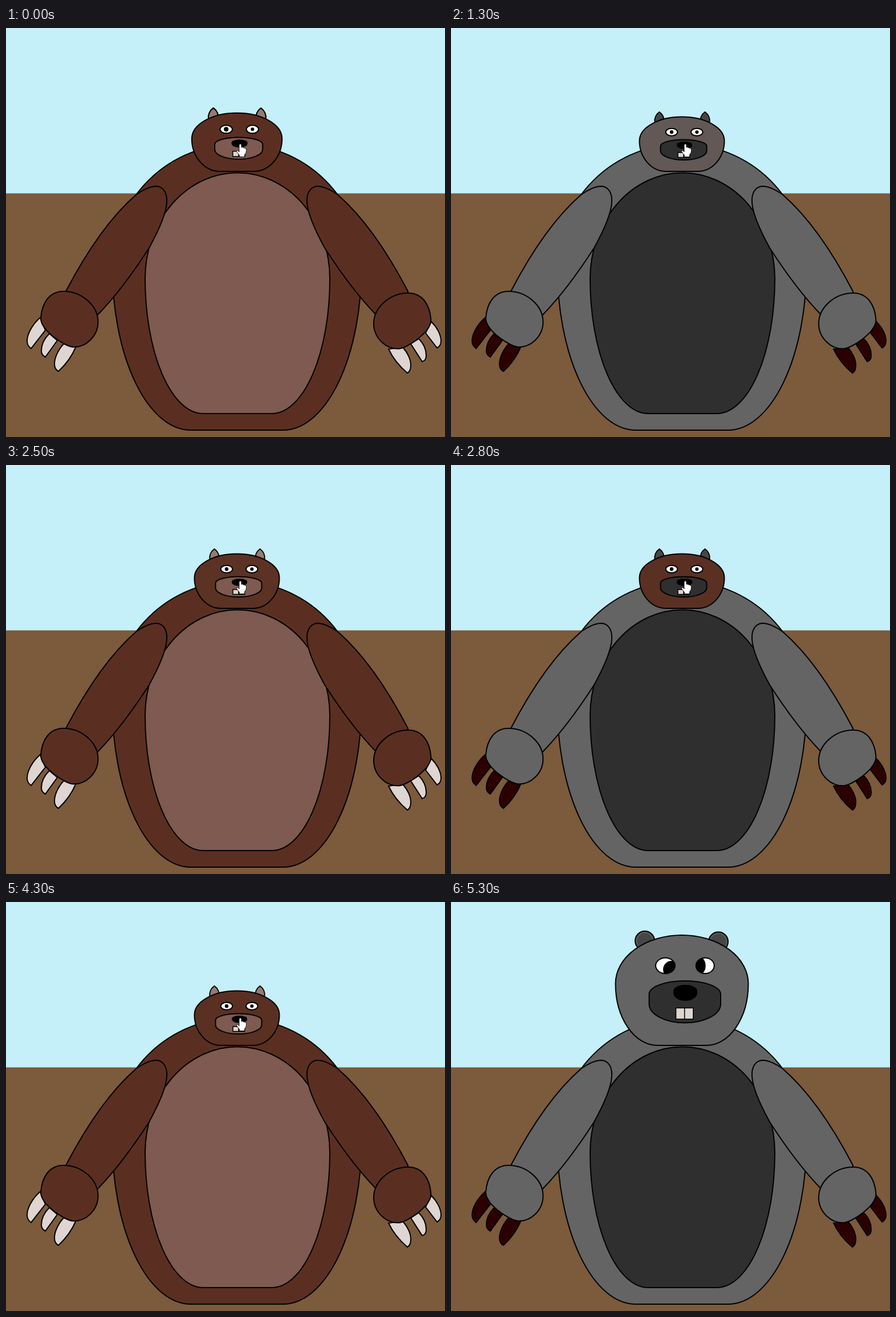
An HTML page with a canvas for the animation above (5.4 s loop, 770x716 px).

```html
<!DOCTYPE html>
<html lang="en">
<head>
<meta charset="utf-8">
<title>Bear</title>
<style>
html, body { margin: 0; width: 100%; height: 100%; overflow: hidden; }
canvas { display: block; }
</style>
</head>
<body>
<canvas id="stage" width="770" height="716"></canvas>
<script>
const ctx = document.getElementById('stage').getContext('2d');
const LOOP = 5400, STEP = 100, LEAVE = 4330;
const FLIPS = [830, 1780, 2760, 3500, LEAVE]; // coat toggles brown <-> grey
const BROWN = { coat: [90, 47, 33], belly: '#7e5a50', claw: '#dfd5d1', ear: '#957b71' };
const GREY = { coat: [100, 100, 100], belly: '#2f2f2f', claw: '#2d0000', ear: '#454747' };

const arm = new Path2D('M105 461C150 375 190 325 228 292C240 283 254 277 264 277' +
  'C277 278 283 290 282 305C281 325 268 354 251 385C222 430 192 470 161 502L110 510Z');
const paw = new Path2D('M61 508C63 480 77 461 101 461C132 461 161 485 161.5 514' +
  'C161.5 540 140 559 118 558.5C104 558 61 530 61 508Z');
const claws = new Path2D('M60 507C46 519 37 536 37 548C37 555 40 558 44 561L69 529Z' +
  'M76 535C66 545 62 556 62 565C62 571 65 574 69 576L90 547Z' +
  'M101 553C91 564 85 578 85 588C85 595 88 599 92 601C104 590 116 574 123 557Z' +
  'M746 514C756 524 763 537 763 548C763 555 760 558 756 560L736 534Z' +
  'M724 544C732 552 737 563 737 573C737 580 734 583 730 584L710 553Z' +
  'M696 559C704 568 710 580 710 590C710 598 708 602 704 604C691 593 678 577 671 562Z');
const earTip = new Path2D('M0 -10C6 -6 9 1 8 8L-8 8C-9 1 -6 -6 0 -10Z');
const pointer = new Path2D('M409 213V205Q409 203 411 203Q413 203 413 205V209Q416 208 417 210' +
  'Q419 209.5 420 211Q422 211 421.5 214L421 218L418.5 222V225.5H409.5V223L404.5 216.5' +
  'Q404 214.5 406 214.5Q407.5 214.5 409 217Z');

const lerp = (a, b, k) => a + (b - a) * k;
const rgb = c => `rgb(${c.map(Math.round)})`;

// cubic-bezier(.25, .1, .25, 1)
function ease(x) {
  if (x <= 0) return 0;
  if (x >= 1) return 1;
  let lo = 0, hi = 1;
  for (let i = 0; i < 24; i++) {
    const u = (lo + hi) / 2;
    if (.75 * u * (1 - u) + u ** 3 < x) lo = u; else hi = u;
  }
  return .3 * lo * (1 - lo) ** 2 + 3 * lo * lo * (1 - lo) + lo ** 3;
}

function paint(path, fill, line = 2) {
  ctx.fillStyle = fill;
  ctx.fill(path);
  ctx.lineWidth = line;
  if (line) ctx.stroke(path);
}

// Domed box: full-width top arc, bottom corners of relative size bx, by
function blob(x0, y0, x1, y1, top = .44, bx = .315, by = 1 - top) {
  const w = x1 - x0, h = y1 - y0, p = new Path2D();
  p.ellipse((x0 + x1) / 2, y0 + top * h, w / 2, top * h, 0, Math.PI, 2 * Math.PI);
  p.ellipse(x1 - bx * w, y1 - by * h, bx * w, by * h, 0, 0, Math.PI / 2);
  p.ellipse(x0 + bx * w, y1 - by * h, bx * w, by * h, 0, Math.PI / 2, Math.PI);
  p.closePath();
  return p;
}

function oval(x, y, rx, ry = rx) {
  const p = new Path2D();
  p.ellipse(x, y, rx, ry, 0, 0, 2 * Math.PI);
  return p;
}

function mirrored(axis, dy, draw) {
  draw();
  ctx.save();
  ctx.transform(-1, 0, 0, 1, 2 * axis, dy);
  draw();
  ctx.restore();
}

function drawEar(x, y, r, hovered, color) {
  if (!hovered) {
    paint(oval(x, y, r), '#575757');
    paint(oval(x, y, r * .78), color, 0);
    return;
  }
  ctx.save();
  ctx.translate(x, y);
  ctx.scale(r / 8, r / 8);
  paint(earTip, color);
  ctx.restore();
}

function drawEye(x, y, rx, ry, px, py, prx, pry) {
  const eye = oval(x, y, rx, ry);
  ctx.save();
  ctx.clip(eye);
  paint(eye, '#fff', 0);
  paint(oval(x + px, y + py, prx, pry), '#000', 0);
  ctx.restore();
  ctx.lineWidth = 2;
  ctx.stroke(eye);
}

function drawHead(t, coat, skin) {
  const hovered = t < LEAVE;
  const k = 1.27 * (hovered ? 1 - ease((t + 1420) / 2000) : ease((t - LEAVE) / 2000));
  const glance = ease((t - LEAVE) / 1000);
  const at = (a, b) => lerp(a, b, k);
  const half = 74.5 + (hovered ? 67 : 42) * k;

  drawEar(at(365.5, 340), at(157, 68), at(8, 17), hovered, skin.ear);
  drawEar(at(445.5, 469), at(157, 69.5), at(8, 17), hovered, skin.ear);
  paint(blob(405 - half, at(155.5, 58), 405 + half, 251), coat);

  drawEye(at(387, 376), at(182.3, 111.5), at(10.3, 17), at(6.5, 13.7),
    11 * glance, 6.5 * glance, at(3.2, 15), at(3.2, 15));
  drawEye(at(431.3, 445.7), at(182.3, 111.5), at(10.3, 16), at(6.5, 13.7),
    -8 * glance, 0, 3 + 6 * glance, 3 + 11 * glance);

  paint(blob(at(367.5, 347.5), at(195.5, 138), at(448.5, 473), at(231, 211.5), .32, .5, .45), skin.belly);
  paint(blob(at(396, 390), at(199, 145), at(423, 432), at(212, 173), .38, .5, .5), '#000', 0);

  const left = at(398, 394.5), width = at(10.3, 15.2), top = at(218, 185.5), height = at(8.5, 19.5);
  for (const i of [0, 1]) {
    const tooth = new Path2D();
    tooth.rect(left + i * width, top, width, height);
    paint(tooth, '#dfd5d1', 1.5);
  }
  if (hovered) paint(pointer, '#fff', .8);
}

function draw(t) {
  const flips = FLIPS.filter(f => f <= t);
  const grey = flips.length % 2 === 1;
  const skin = grey ? GREY : BROWN, before = grey ? BROWN : GREY;
  const fade = flips.length ? ease((t - flips[flips.length - 1]) / 1000) : 1;
  const coat = rgb(skin.coat);
  const headCoat = rgb(skin.coat.map((c, i) => lerp(before.coat[i], c, fade)));

  ctx.fillStyle = '#c5f0f9';
  ctx.fillRect(0, 0, 770, 716);
  ctx.fillStyle = '#7c5a3c';
  ctx.fillRect(0, 289.5, 770, 427);
  ctx.strokeStyle = '#000';

  paint(blob(186.5, 203, 623.5, 704, .43), coat);
  paint(blob(244, 253.5, 568, 675), skin.belly);
  mirrored(405, 0, () => paint(arm, coat));
  paint(claws, skin.claw);
  mirrored(403.2, 3, () => paint(paw, coat));
  drawHead(t, headCoat, skin);
}

function tick(now) {
  draw(Math.floor(now % LOOP / STEP) * STEP);
  requestAnimationFrame(tick);
}
tick(0);
</script>
</body>
</html>
```
